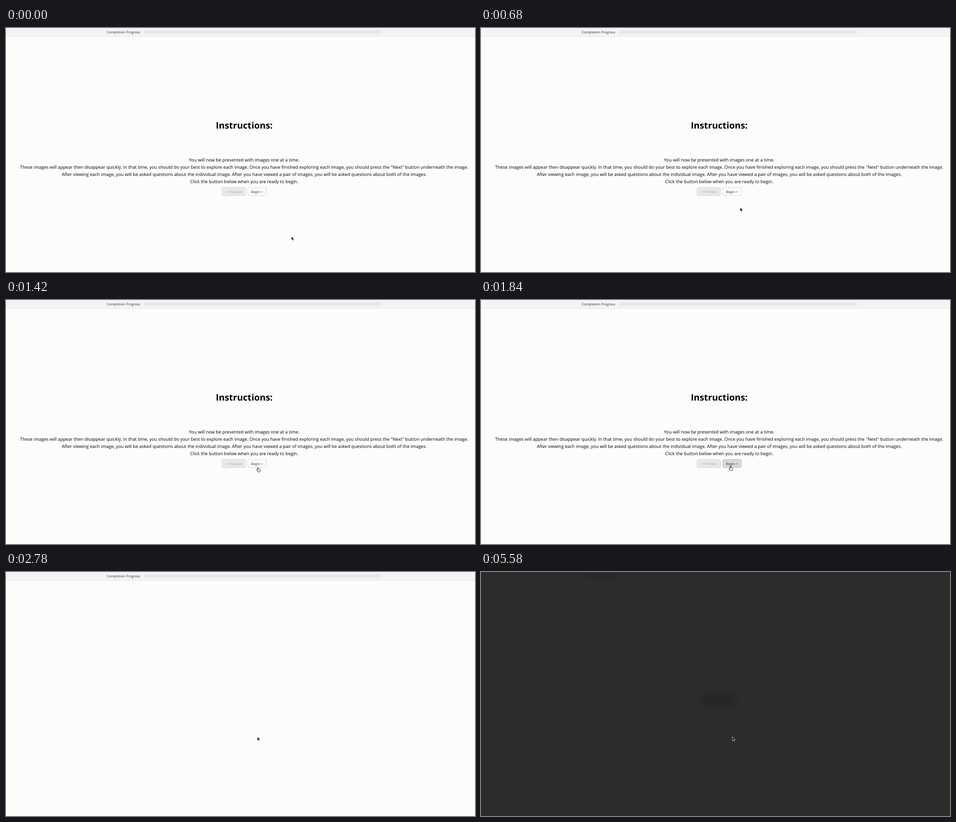
Write an HTML page that moves like this. It is 1035 px wide and 541 px high and loops after 8000 ms.

```html
<!DOCTYPE html>
<html lang="en">
<head>
<meta charset="utf-8">
<title>Instructions</title>
<style>
  html, body { margin: 0; width: 100%; height: 100%; overflow: hidden; background: #fcfcfb; }
  svg { display: block; width: 100%; height: 100%; }
  text { font-family: "Open Sans", "Noto Sans", sans-serif; text-rendering: geometricPrecision; }
  .body { font-size: 9.9px; text-anchor: middle; }
  .title { font-size: 19.8px; font-weight: 700; text-anchor: middle; }
  .small { font-size: 7.7px; fill: #333; text-anchor: middle; }
</style>
</head>
<body>
<svg viewBox="0 0 1035 541">
  <defs>
    <filter id="soft" x="-50%" y="-50%" width="200%" height="200%"><feGaussianBlur stdDeviation="4"/></filter>
  </defs>
  <rect width="1035" height="541" fill="#fcfcfb"/>
  <rect width="1035" height="18.5" fill="#f4f4f4"/>
  <rect y="18" width="1035" height="1" fill="#dedede"/>
  <text class="small" x="259" y="12">Completion Progress</text>
  <rect x="304" y="5" width="526" height="8" fill="#e8e8e7"/>

  <g id="content">
    <text class="title" x="525.7" y="223.2">Instructions:</text>
    <g id="lines"></g>
    <rect x="477" y="353.8" width="51.3" height="17.6" rx="2" fill="#e9e9e7" stroke="#cbcbc9" stroke-width=".8"/>
    <text class="small" x="502.7" y="365.7" style="fill:#a2a2a0">&lt; Previous</text>
    <rect id="begin" x="533.9" y="353.8" width="40.3" height="17.6" rx="2" stroke-width=".8"/>
    <text class="small" x="554" y="365.7">Begin &gt;</text>
  </g>

  <g id="dark">
    <rect width="1035" height="541" fill="#2c2c2b"/>
    <ellipse cx="262" cy="11" rx="36" ry="4" fill="#282828" filter="url(#soft)"/>
    <rect id="smudge" x="489" y="267" width="74" height="30" rx="8" fill="#272726" filter="url(#soft)"/>
  </g>

  <g id="cursor">
    <path id="arrow" d="M0 0V8.6L2 6.8L3.3 9.8L4.8 9.2L3.5 6.2H6Z" fill="#000" stroke="#fff" stroke-width=".7"/>
    <path id="hand" d="M-.9 1Q-.9 0 0 0T.9 1V3.6Q1.6 2.9 2.3 3.7Q3.1 3.2 3.6 4.1Q4.7 3.9 4.7 5V7Q4.6 8.2 3.9 9.8H-.2Q-1 8.1-2.7 6.2Q-3.4 5.2-2.4 5Q-1.6 4.9-.9 5.9Z" fill="#fff" stroke="#000" stroke-width=".9" stroke-linejoin="round"/>
  </g>
</svg>
<script>
const LOOP = 8000;
const HOVER = 1520, PRESS = 2240, CLEAR = 2400, DARK = 5200;
const HAND = [1400, 2380];

const lines = [
  'You will now be presented with images one at a time.',
  'These images will appear then disappear quickly. In that time, you should do your best to explore each image. Once you have finished exploring each image, you should press the "Next" button underneath the image.',
  'After viewing each image, you will be asked questions about the individual image. After you have viewed a pair of images, you will be asked questions about both of the images.',
  'Click the button below when you are ready to begin.'
];

// Pointer tip: time, x, y
const path = [
  [20, 630, 462], [680, 572, 398], [820, 561, 380.5],
  [1100, 561, 380.5], [1240, 557, 377.3], [1399, 557, 377.3],
  [1400, 556, 371.3], [1520, 556, 371.3], [1660, 550.5, 368.3],
  [1840, 550.5, 368.3], [1960, 554.8, 365.3]
];

const $ = id => document.getElementById(id);
const show = (id, on) => $(id).setAttribute('visibility', on ? 'visible' : 'hidden');
const clamp = v => Math.max(0, Math.min(1, v));

lines.forEach((line, i) => {
  const text = document.createElementNS('http://www.w3.org/2000/svg', 'text');
  text.setAttribute('class', 'body');
  text.setAttribute('x', 525.7);
  text.setAttribute('y', 296.4 + i * 15.84);
  text.textContent = line;
  $('lines').append(text);
});

function pointerAt(t) {
  const next = path.findIndex(p => p[0] > t);
  if (next === 0) return path[0].slice(1);
  if (next < 0) return path[path.length - 1].slice(1);
  const [t0, x0, y0] = path[next - 1], [t1, x1, y1] = path[next];
  const k = (t - t0) / (t1 - t0);
  return [x0 + (x1 - x0) * k, y0 + (y1 - y0) * k];
}

function draw(t) {
  const hand = t >= HAND[0] && t < HAND[1];
  show('hand', hand);
  show('arrow', !hand);
  show('content', t < CLEAR);
  show('dark', t >= DARK);
  $('begin').setAttribute('fill', t < HOVER ? '#fefefe' : '#d9d9d7');
  $('begin').setAttribute('stroke', t < HOVER ? '#cbcbc9' : t < PRESS ? '#aaa' : '#000');
  $('smudge').setAttribute('opacity', clamp((t - 5300) / 280));
  $('cursor').setAttribute('transform', `translate(${pointerAt(t)})`);
}

const start = performance.now();
function tick() {
  draw((performance.now() - start) % LOOP);
  requestAnimationFrame(tick);
}
tick();
</script>
</body>
</html>
```
